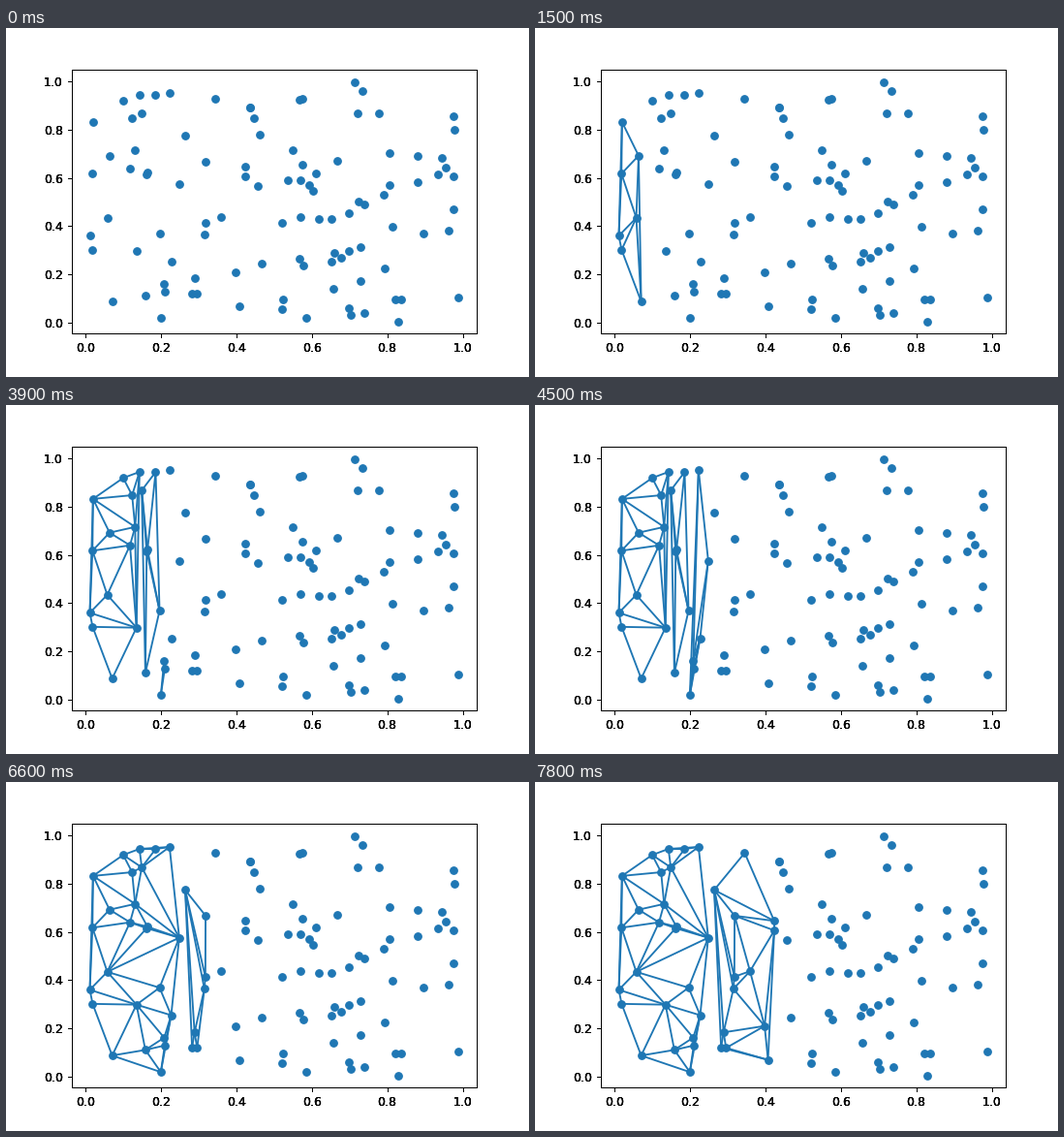
Recreate the animation shown at these times as a matplotlib script. Size 540 px wide and 360 px high, loop 8000 ms.

```python
from itertools import combinations

import matplotlib.pyplot as plt
import numpy as np
from matplotlib.animation import FuncAnimation
from matplotlib.collections import LineCollection
from matplotlib.tri import Triangulation

TICK_MS = 100
LOOP_MS = 8000
STEP_MS = 300
COLOR = "#1f77b4"

np.random.seed(0)
points = np.random.rand(100, 2)
points = points[np.lexsort((points[:, 1], points[:, 0]))]


def delaunay_edges(lo, hi):
    if hi - lo <= 3:
        return set(combinations(range(lo, hi), 2))
    edges = Triangulation(*points[lo:hi].T).edges + lo
    return {tuple(sorted(edge)) for edge in edges.tolist()}


def divide_and_conquer(lo, hi, history):
    """Record the edge set after every leaf and every merge."""
    if hi - lo > 3:
        mid = (lo + hi + 1) // 2
        divide_and_conquer(lo, mid, history)
        divide_and_conquer(mid, hi, history)
    outside = {edge for edge in history[-1] if edge[1] < lo or edge[0] >= hi}
    history.append(outside | delaunay_edges(lo, hi))


history = [set()]
divide_and_conquer(0, len(points), history)

plt.rcParams.update({"font.family": "DejaVu Sans", "font.size": 10})
fig = plt.figure(figsize=(6, 4), dpi=90, facecolor="white")
box = [0.125, 0.125, 0.775, 0.755]
ax = fig.add_axes(box)
ax.plot(*points.T, "o", color=COLOR, markersize=6)
mesh = LineCollection([], colors=COLOR, linewidths=1.5, zorder=2)
ax.add_collection(mesh, autolim=False)

# Stacked copies of the tick labels give them their heavier weight.
for _ in range(3):
    fig.add_axes(box, sharex=ax, sharey=ax, frameon=False)


def update(frame):
    step = frame * TICK_MS // STEP_MS
    mesh.set_segments([points[list(edge)] for edge in sorted(history[step])])
    return [mesh]


anim = FuncAnimation(fig, update, frames=LOOP_MS // TICK_MS, interval=TICK_MS,
                     repeat=True, repeat_delay=0, blit=False)
plt.show()
```
